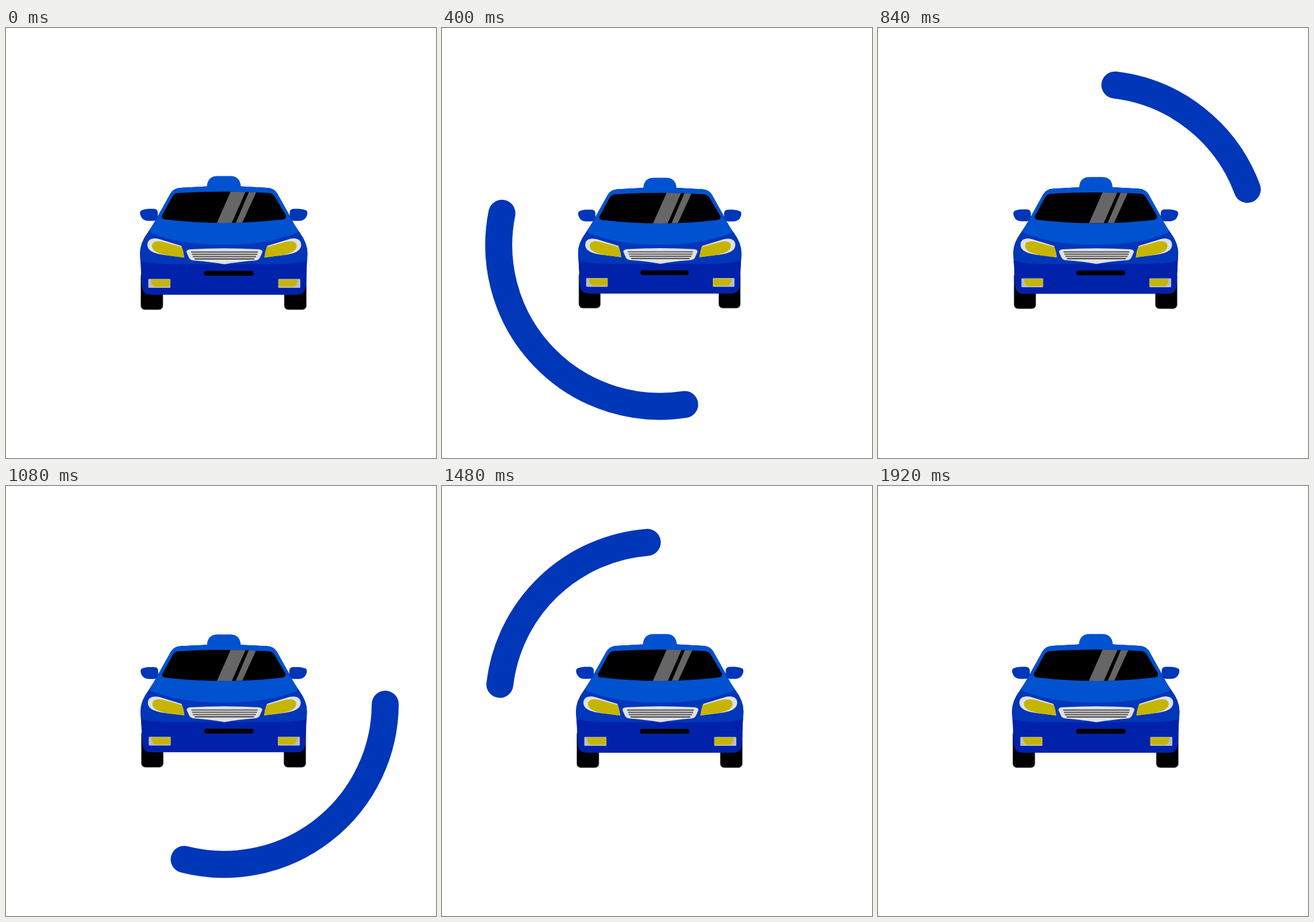
An HTML page that plays this animation: 748 px wide and 748 px high, repeating every 1.96 s.

```html
<!DOCTYPE html>
<html lang="en">
<head>
<meta charset="utf-8">
<title>Taxi loader</title>
<style>
  html, body { margin: 0; width: 100%; height: 100%; overflow: hidden; background: #fff; }
  svg { display: block; width: 100vw; height: 100vh; }
</style>
</head>
<body>
<svg viewBox="0 0 748 748">
  <defs>
    <clipPath id="glass">
      <path id="pane" d="M271 327 L289 294 Q292 288 299 287 Q378 282 458 287 Q465 288 468 294 L487 326 Q488 332 482 333 Q379 345 276 333 Q270 332 271 327Z"/>
    </clipPath>
    <clipPath id="shell">
      <path id="body" d="M286 288 Q291 279 303 278 L350 275.500 H408 L455 278 Q467 279 472 288 L496 331 Q501 342 511 356 Q524.500 374 524.500 392 L522 448 Q521 464 506 464 H252 Q237 464 236 448 L233 392 Q233 374 246.500 356 Q256 342 262 331Z"/>
    </clipPath>
    <g id="wheel">
      <rect x="234.500" y="425" width="38.500" height="65" rx="7" stroke="#777" stroke-width=".8"/>
    </g>
    <path id="mirror" fill="#0036b8" d="M235 317.500 Q240 315 248 314.500 H257 Q264 315 264 321 V328 Q263 335.500 256 335.500 H247 Q237 335 234 326 Q232 320 235 317.500Z"/>
    <g id="lights">
      <path fill="#dfe1e6" d="M246 377 C246 367 256 364.500 266 367 L305 379 Q309 389 310 399 L280 395.500 C258 393 246 388 246 377Z"/>
      <path fill="#c6b500" d="M254 379 C254 371 263 370 271 371.500 L306 381 Q309 390 310 399.500 L284 396 C265 393 254 388 254 379Z"/>
      <rect x="247.500" y="436.500" width="38.500" height="15.500" rx="1.500" fill="#b9bdc4"/>
      <path fill="#c6b500" d="M252 437.500 H285.500 V450 H259 Q253 448 252 437.500Z"/>
    </g>
  </defs>
  <g id="car">
    <use href="#wheel"/>
    <use href="#wheel" transform="translate(757 0) scale(-1 1)"/>
    <g clip-path="url(#shell)">
      <use href="#body" fill="#0022aa"/>
      <path fill="#0036b8" d="M225 270 H533 V402 Q512 411 470 411 H288 Q246 411 225 402Z"/>
      <path fill="#0052d0" d="M240 270 H518 L507 356 Q456 377 379 377 Q302 377 251 356Z"/>
    </g>
    <path fill="#0052d0" d="M349.500 278 V275 Q351 257.500 368 257.500 H390 Q407 257.500 408.500 275 V278Z"/>
    <use href="#pane"/>
    <g clip-path="url(#glass)" fill="#666">
      <path d="M392 282 H418 L391 343 H365Z"/>
      <path d="M424 282 H437 L409 343 H398Z"/>
    </g>
    <use href="#mirror"/>
    <use href="#mirror" transform="translate(757.500 0) scale(-1 1)"/>
    <use href="#lights"/>
    <use href="#lights" transform="translate(759.500 0) scale(-1 1)"/>
    <path fill="#e0e1e4" d="M314 390 Q313 386 320 385 Q380 381.500 440 385 Q447 386 446 390 L442 399 Q440 404 433 404.500 Q402 407 380 411 Q358 407 327 404.500 Q320 404 318 399Z"/>
    <g fill="none" stroke="#666" stroke-width="2.400">
      <path d="M322 389.700 H438 M323.500 393.700 H437 M325 397.700 H435"/>
      <path stroke="#333" stroke-width="2" d="M328 401.700 H432"/>
    </g>
    <rect x="344.500" y="422.500" width="86" height="8.500" rx="4"/>
  </g>
  <path id="arc" fill="none" stroke="#0036b8" stroke-width="47" stroke-linecap="round"/>
</svg>
<script>
  const LOOP = 1960, STEP = 40;
  const CX = 379.2, CY = 377.7, R = 280.5;
  const car = document.getElementById('car');
  const arc = document.getElementById('arc');

  // Cubic ease with handles (x1, 0) and (x2, 1)
  function ease(x, x1 = 1 / 3, x2 = 2 / 3) {
    if (x <= 0) return 0;
    if (x >= 1) return 1;
    let lo = 0, hi = 1;
    for (let i = 0; i < 30; i++) {
      const u = (lo + hi) / 2, v = 1 - u;
      if (3 * x1 * u * v * v + 3 * x2 * u * u * v + u * u * u < x) lo = u;
      else hi = u;
    }
    return lo * lo * (3 - 2 * lo);
  }

  const span = (t, from, to, ...handles) => ease((t - from) / (to - from), ...handles);

  function point(deg) {
    const a = deg * Math.PI / 180;
    return (CX + R * Math.sin(a)).toFixed(3) + ' ' + (CY - R * Math.cos(a)).toFixed(3);
  }

  function draw(t) {
    const head = 360 * (span(t, 23, 563) + span(t, 563, 1545));
    const tail = 360 * (span(t, 0, 764, 0.333, 0.777) + span(t, 764, 1900, 0.273, 0.564));
    const from = Math.min(head, tail), to = Math.max(head, tail);
    arc.setAttribute('d', to - from < 0.001 ? '' :
      `M${point(from)}A${R} ${R} 0 ${to - from > 180 ? 1 : 0} 1 ${point(to)}`);

    const scale = 1 - 0.0247 * (span(t, 0, 420) - span(t, 420, 1400));
    car.setAttribute('transform',
      `translate(${CX} ${CY}) scale(${scale}) translate(${-CX} ${-CY})`);
  }

  const start = performance.now();
  function tick() {
    const t = (performance.now() - start) % LOOP;
    draw(Math.floor(t / STEP) * STEP);
    requestAnimationFrame(tick);
  }
  draw(0);
  requestAnimationFrame(tick);
</script>
</body>
</html>
```
